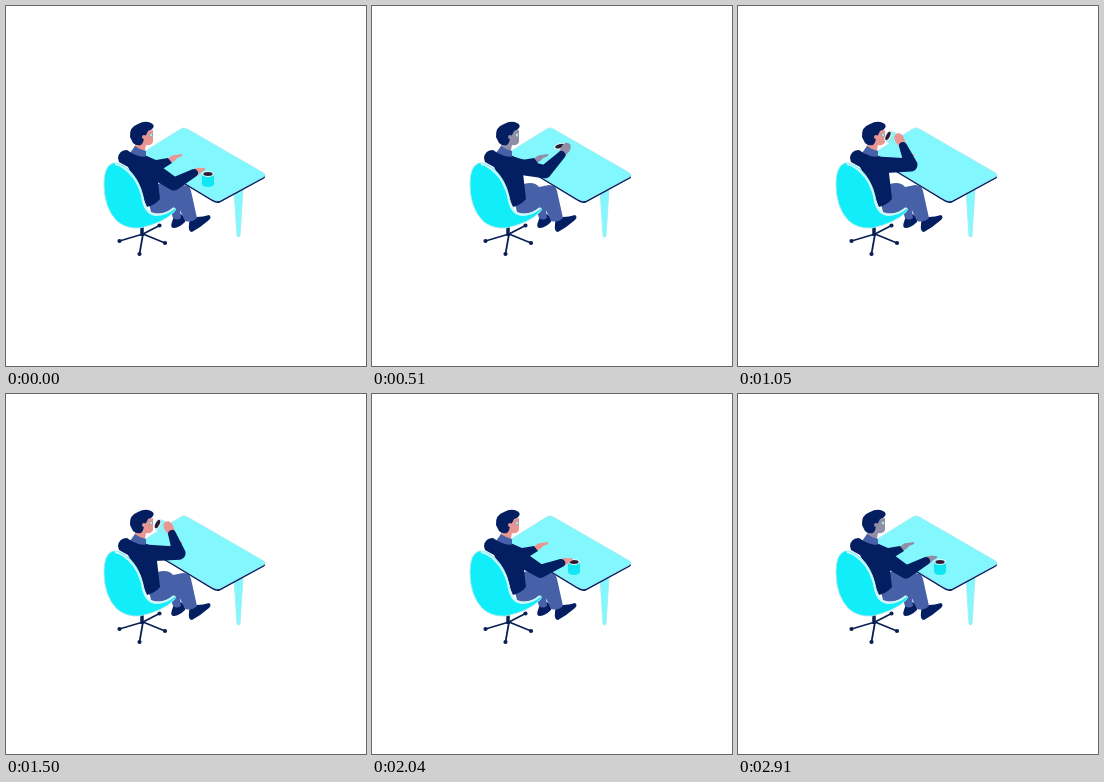
An HTML page for the animation above (2940 ms loop, 360x360 px).

```html
<!DOCTYPE html>
<html lang="en">
<head>
<meta charset="utf-8">
<title>Coffee at the desk</title>
<style>
  html, body { margin: 0; width: 100%; height: 100%; overflow: hidden; background: #fff; }
  svg { display: block; width: 100vw; height: 100vh; --skin: #e99693; }
  .skin { fill: var(--skin); }
  .navy { fill: #041e62; }
  .cloth { fill: #4761a8; }
  .cyan { fill: #11edf9; }
  .pale { fill: #82f8fe; }
  .edge { stroke: #a6ebf0; stroke-width: .9; }
  #base { fill: #0a2054; stroke: #0a2054; stroke-width: 1.8; }
</style>
</head>
<body>
<svg viewBox="0 0 360 360">
  <!-- legs and shoes -->
  <path class="navy" d="M168 210 L175 208 Q180 212 179 216 Q173 222 167 222 Q164 221 166 216 Z"/>
  <path class="navy" d="M184 211 L191 211 Q197 211 203 209 Q206 211 203 214 Q195 221 186 226 Q182 226 183 218 Z"/>
  <path class="cloth" d="M160 190 L172 188 L175 212 Q171 215 167 212 Z"/>
  <path class="cloth" d="M141 190 Q146 177 158 177 Q164 177 167 181 L177 179 Q184 179 185 185 L191 212 Q186 217 179 215 L172 200 Q157 211 145 206 Z"/>

  <!-- desk -->
  <path class="pale edge" d="M228 184 H237 L234 230 Q232 232 231 230 Z"/>
  <path class="navy" id="deskEdge"/>
  <path class="pale edge" id="deskTop"/>

  <!-- far arm -->
  <path class="skin" d="M161 154 Q165 149 169 149 L176 148 Q178 150 171 152 Q168 157 163 156 Z"/>
  <path class="navy" d="M134 147 Q143 151 150 154 L162 152 L166 157 Q157 163 149 167 L137 166 Z"/>

  <!-- head -->
  <path class="skin" d="M130 137 L141 125 L147 124 L147 136 Q145 140 140 139 L138 149 L127 145 Z"/>
  <path class="navy" d="M124 131 Q123 121 132 118 Q139 114 145 117 Q149 119 147 122 Q146 124 142 125 Q140 130 138 131 Q138 136 135 139 Q130 140 127 137 Z"/>
  <circle class="skin" cx="138" cy="131" r="2"/>
  <ellipse cx="145" cy="129" rx="1.400" ry="2" fill="#b9f2ee" stroke="#68758d" stroke-width=".5"/>

  <!-- body -->
  <path class="cloth" d="M124 147 L129 140 Q134 144 140 145 V153 H131 Z"/>
  <path class="navy" d="M112 152 Q113 144 121 144 Q129 150 138 151 Q148 158 151 167 L154 193 Q149 199 141 201 L134 185 L122 161 L113 156 Z"/>

  <!-- chair -->
  <g id="base"><path d="M136 220 V230" stroke-width="3.500"/></g>
  <path class="cyan edge" d="M107 157 Q98 160 98 178 Q98 202 111 215 Q120 223 134 222 Q157 217 168 206 Q171 202 168 202 Q157 211 147 208 Q139 205 137 190 Q133 173 122 163 Q114 156 107 157 Z"/>
  <path d="M109 158 Q119 160 128 172 Q135 182 137 195 Q140 208 150 209 Q160 209 168 202" fill="none" stroke="#d0f8fa" stroke-width="2"/>

  <!-- cup and near arm -->
  <g id="cup">
    <path id="cupBody" d="M-6 0 V10 Q-5 13 0 13 Q5 13 6 10 V0 Z"/>
    <ellipse rx="6" ry="3" fill="#e6f7f8"/>
    <ellipse rx="4.600" ry="1.900" fill="#2b1c35"/>
  </g>
  <path id="palm" class="skin"/>
  <path id="sleeve" class="navy"/>
</svg>
<script>
const LOOP = 2940, STEP = 60;
const $ = id => document.getElementById(id);
const svg = document.querySelector("svg");
const mix = (a, b, p) => a + (b - a) * p;
const point = (x, y) => ({ x, y });
const blend = (a, b, p) => point(mix(a.x, b.x, p), mix(a.y, b.y, p));

// Polygon whose corners are cut back by a share of each side
function rounded(corners, cut) {
  const n = corners.length, at = p => `${p.x} ${p.y}`;
  return corners.map((c, i) => {
    const from = blend(c, corners[(i + n - 1) % n], cut);
    const to = blend(c, corners[(i + 1) % n], cut);
    return `${i ? "L" : "M"}${at(from)} Q${at(c)} ${at(to)}`;
  }).join(" ") + "Z";
}

const desk = [point(178, 121), point(261, 169), point(211, 196), point(133, 149)];
$("deskTop").setAttribute("d", rounded(desk, 0.06));
$("deskEdge").setAttribute("d", rounded(desk.map(c => point(c.x, c.y + 2)), 0.06));

const feet = [point(113.5, 235), point(133.5, 248), point(159, 237), point(153.5, 219.5)];
$("base").innerHTML += feet.map(f =>
  `<path d="M137 228 L${f.x} ${f.y}"/><circle cx="${f.x}" cy="${f.y}" r="1.2"/>`).join("");

// The arm moves between three poses
const cupRest = point(202, 168);
const rest = { elbow: point(168, 178), wrist: point(188, 167), tip: point(199, 163), cup: cupRest };
const hold = { elbow: point(170, 175), wrist: point(194, 176), tip: point(206, 175), cup: cupRest };
const sip = { elbow: point(173, 159), wrist: point(165, 140), tip: point(159, 127), cup: point(150, 130) };

const smooth = p => { p = Math.min(1, Math.max(0, p)); return p * p * (3 - 2 * p); };
const ramp = (t, a, b) => smooth((t - a) / (b - a));
const pulse = (t, a, b, c, d) => ramp(t, a, b) - ramp(t, c, d);

function armAt(reach, lift) {
  const arc = Math.sin(Math.PI * lift);
  const arm = {};
  for (const part in rest) {
    const p = blend(blend(rest[part], hold[part], reach), sip[part], lift);
    // The hand and cup swing outwards on the way
    const swing = part === "elbow" ? 0.2 : 1;
    arm[part] = point(p.x + 8 * arc * swing, p.y - 12 * arc * swing);
  }
  return arm;
}

// Round-ended limb that narrows from radius r to radius s
function limb(a, r, b, s) {
  const dx = b.x - a.x, dy = b.y - a.y;
  const angle = Math.atan2(dy, dx), open = Math.acos((r - s) / Math.hypot(dx, dy));
  const on = (c, q, side) =>
    `${c.x + q * Math.cos(angle + side * open)} ${c.y + q * Math.sin(angle + side * open)}`;
  return `M${on(a, r, 1)} A${r} ${r} 0 1 1 ${on(a, r, -1)} ` +
    `L${on(b, s, -1)} A${s} ${s} 0 0 1 ${on(b, s, 1)} Z`;
}

const shoulder = point(139, 159);
const mitten = "M-2 -3 Q3 -5 7 -3 L12 -1 Q13 1 6 2 Q2 5 -2 3 Z";
const fist = "M-2 -3 L3 -4 Q8 -6 12 -4 Q15 -1 13 2 Q10 5 5 4 L-2 3 Z";

function draw(t) {
  const lift = pulse(t, 240, 840, 1440, 1800);
  const { elbow, wrist, tip, cup } = armAt(pulse(t, 0, 240, 1800, 2100), lift);
  const held = t >= 240 && t <= 1830;
  const hand = Math.atan2(tip.y - wrist.y, tip.x - wrist.x) * 180 / Math.PI;

  $("cup").setAttribute("transform", `translate(${cup.x} ${cup.y}) rotate(${-64 * lift ** 1.5})`);
  $("cupBody").setAttribute("fill", held ? "#8ef1f5" : "#11e6f4");
  $("palm").setAttribute("d", held ? fist : mitten);
  $("palm").setAttribute("transform", `translate(${wrist.x} ${wrist.y}) rotate(${hand})`);
  $("sleeve").setAttribute("d", limb(shoulder, 8.5, elbow, 6.5) + limb(elbow, 6.5, wrist, 4));

  const muted = (t >= 270 && t < 780) || t >= 2070;
  svg.style.setProperty("--skin", muted ? "#918da5" : "#e99693");
}

// The picture advances in short holds
const snap = t => t < 30 ? 0 : 30 + Math.floor((t - 30) / STEP) * STEP;

const begin = performance.now();
function tick() {
  draw(snap((performance.now() - begin) % LOOP));
  requestAnimationFrame(tick);
}
draw(0);
requestAnimationFrame(tick);
</script>
</body>
</html>
```
